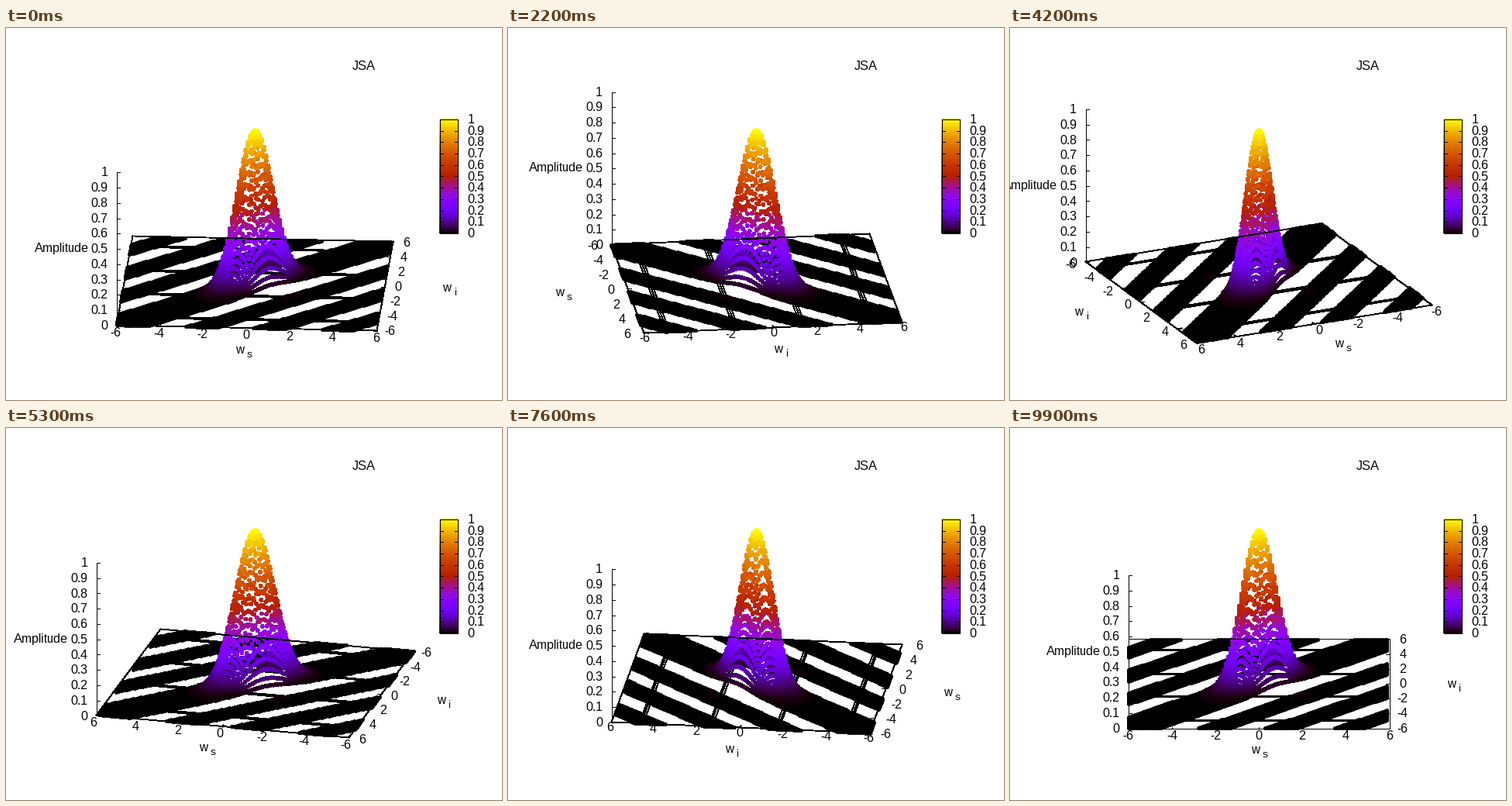
A matplotlib script that plays this animation: 640 px wide and 480 px high, repeating every 10 s.

```python
import numpy as np
import matplotlib.pyplot as plt
from matplotlib.animation import FuncAnimation
from matplotlib.colors import ListedColormap

W, H, DPI = 640, 480, 100
PX = 72 / DPI
FRAMES, INTERVAL = 100, 100
CX, CY = 320.5, 329.0
HALF = 168.2                      # pixels for half of a floor side
TILT = np.cos(np.radians(70))
ZLEN = 197.5                      # pixels for amplitude 1
LIMIT = 6
FONT = 16 * PX
DROP = 5.6                        # from text middle to baseline
DOT = 5 * PX

plt.rcParams.update({"font.family": "Liberation Sans", "text.hinting": "native",
                     "text.hinting_factor": 1})


def palette(v):
    v = np.asarray(v, float)
    blue = np.clip(np.sin(2 * np.pi * v), 0, 1)
    return np.stack([np.sqrt(v), v ** 3, blue], axis=-1)


def rotate(x, y, rot):
    c, s = np.cos(rot), np.sin(rot)
    return x * c + y * s, y * c - x * s


def project(x, y, z, rot):
    u, v = rotate(x, y, rot)
    return CX + HALF * u, CY - HALF * TILT * v - ZLEN * z


# joint spectral amplitude on a half-open grid; negative values are not drawn
axis = np.arange(-60, 60) / 10
ws, wi = (g.ravel() for g in np.meshgrid(axis, axis))
amp = np.exp(-(ws ** 2 + wi ** 2) / 2) * np.sinc(2 * (ws - wi) / np.pi)
shown = amp >= 0
ws, wi, amp = ws[shown] / LIMIT, wi[shown] / LIMIT, amp[shown]
high = amp > 0.004
flat = ~high
peak_rgb = palette(np.clip(amp[high], 0, 1))

# triple rows running along w_s
row_mid = np.round(1.42 + np.pi * np.arange(-2, 2), 1)
rows = (row_mid[:, None] + np.array([-0.1, 0, 0.1])).ravel() / LIMIT

fig = plt.figure(figsize=(W / DPI, H / DPI), dpi=DPI, facecolor="white")
ax = fig.add_axes([0, 0, 1, 1])


def stroke(order):
    return ax.plot([], [], color="black", lw=0.9 * PX, antialiased=False,
                   solid_capstyle="projecting", zorder=order)[0]


def label(text, x=0, y=0, ha="center", size=FONT):
    return ax.text(x, y + DROP, text, ha=ha, va="baseline", fontsize=size,
                   color="black", zorder=6)


def move(text, x, y):
    text.set_position((x, y + DROP))


def segments(pairs):
    """Join separate line segments, on whole pixels, into one broken polyline."""
    xs, ys = [], []
    for (x0, y0), (x1, y1) in pairs:
        xs += [x0, x1, np.nan]
        ys += [y0, y1, np.nan]
    return np.round(xs), np.round(ys)


row_lines = stroke(1)
floor = ax.plot([], [], "o", color="black", ms=DOT, mew=0,
                antialiased=False, zorder=2)[0]
peak = ax.scatter(np.zeros(high.sum()), np.zeros(high.sum()), s=DOT ** 2,
                  c=peak_rgb, linewidths=0, antialiased=False, zorder=3)
frame_lines = stroke(4)
z_lines = stroke(5)
tick_lines = stroke(5)

ticks = np.arange(-6, 7, 2)
s_ticks = [label(str(t)) for t in ticks]
i_ticks = [label(str(t)) for t in ticks]
levels = np.arange(11) / 10
z_ticks = [label(f"{v:g}", ha="right") for v in levels]
z_name = label("Amplitude")
s_name = label("w"), label("s", ha="left", size=FONT * 0.8)
i_name = label("w"), label("i", ha="left", size=FONT * 0.8)

label("JSA", 476, 48, ha="right")

# colour box
LEFT, RIGHT, TOP, BOTTOM = 559, 582, 117, 264
ax.imshow(np.linspace(0, 1, 148)[:, None],
          extent=(LEFT - 0.5, RIGHT + 0.5, BOTTOM + 0.5, TOP - 0.5),
          cmap=ListedColormap(palette(np.linspace(0, 1, 256))), origin="lower",
          aspect="auto", interpolation="nearest", zorder=2)
box = stroke(4)
box.set_data([LEFT, RIGHT, RIGHT, LEFT, LEFT], [TOP, TOP, BOTTOM, BOTTOM, TOP])
marks = []
for v in levels:
    y = BOTTOM + (TOP - BOTTOM) * v
    marks += [((LEFT, y), (LEFT + 4, y)), ((RIGHT - 4, y), (RIGHT, y))]
    label(f"{v:g}", 595, y, ha="left")
stroke(4).set_data(*segments(marks))

ax.set_xlim(-0.5, W - 0.5)
ax.set_ylim(H - 0.5, -0.5)
ax.axis("off")


def place_axis(texts, name, along, out, reach, rot):
    """Lay tick labels and the axis name outside one floor edge."""
    dx, up = rotate(*out, rot)
    dy = -TILT * up
    side = "left" if dx > 0.7 else "right" if dx < -0.7 else "center"
    marks = []
    for value, text in zip(ticks, texts):
        x, y = project(*along(value / LIMIT), 0, rot)
        marks.append(((x, y), (x - 5 * dx, y - 5 * dy)))
        pad = {"left": 3 * (value >= 0), "right": -3, "center": 0}[side]
        text.set_ha(side)
        move(text, x + reach[0] * dx + pad, y + reach[1] * dy)
    x, y = project(*along(0), 0, rot)
    x, y = x + 84 * dx, y + 80 * dy
    move(name[0], x - 4, y)
    move(name[1], x + 5, y + 5)
    return marks


def update(i):
    degrees = 36 * (i + 1) % 3600 / 10
    rot = np.radians(degrees)
    quarter = int(degrees // 90)
    corners = [(-1, -1), (1, -1), (1, 1), (-1, 1)]

    row_lines.set_data(*segments(
        [(project(-1, r, 0, rot), project(axis[-1] / LIMIT, r, 0, rot)) for r in rows]))
    floor.set_data(*project(ws[flat], wi[flat], amp[flat], rot))

    # paint the hill from back to front
    order = np.argsort(-rotate(ws[high], wi[high], rot)[1], kind="stable")
    px, py = project(ws[high], wi[high], amp[high], rot)
    peak.set_offsets(np.column_stack([px, py])[order])
    peak.set_facecolor(peak_rgb[order])

    base = [project(*c, 0, rot) for c in corners]
    zx, zy = base[quarter]
    frame_lines.set_data(*segments([(base[k], base[(k + 1) % 4]) for k in range(4)]))

    marks = [((zx, zy), (zx, zy - ZLEN))]
    for v, text in zip(levels, z_ticks):
        y = zy - ZLEN * v
        marks.append(((zx, y), (zx + 4, y)))
        move(text, zx - 11, y)
    z_lines.set_data(*segments(marks))
    move(z_name, zx - 71, zy - ZLEN / 2 - 1)

    front = -1 if quarter in (0, 3) else 1
    flank = 1 if quarter < 2 else -1
    marks = place_axis(s_ticks, s_name, lambda t: (t, front), (0, front), (14, 26), rot)
    marks += place_axis(i_ticks, i_name, lambda t: (flank, t), (flank, 0), (10, 17), rot)
    tick_lines.set_data(*segments(marks))
    return []


anim = FuncAnimation(fig, update, frames=FRAMES, interval=INTERVAL,
                     repeat=True, repeat_delay=0)
plt.show()
```
